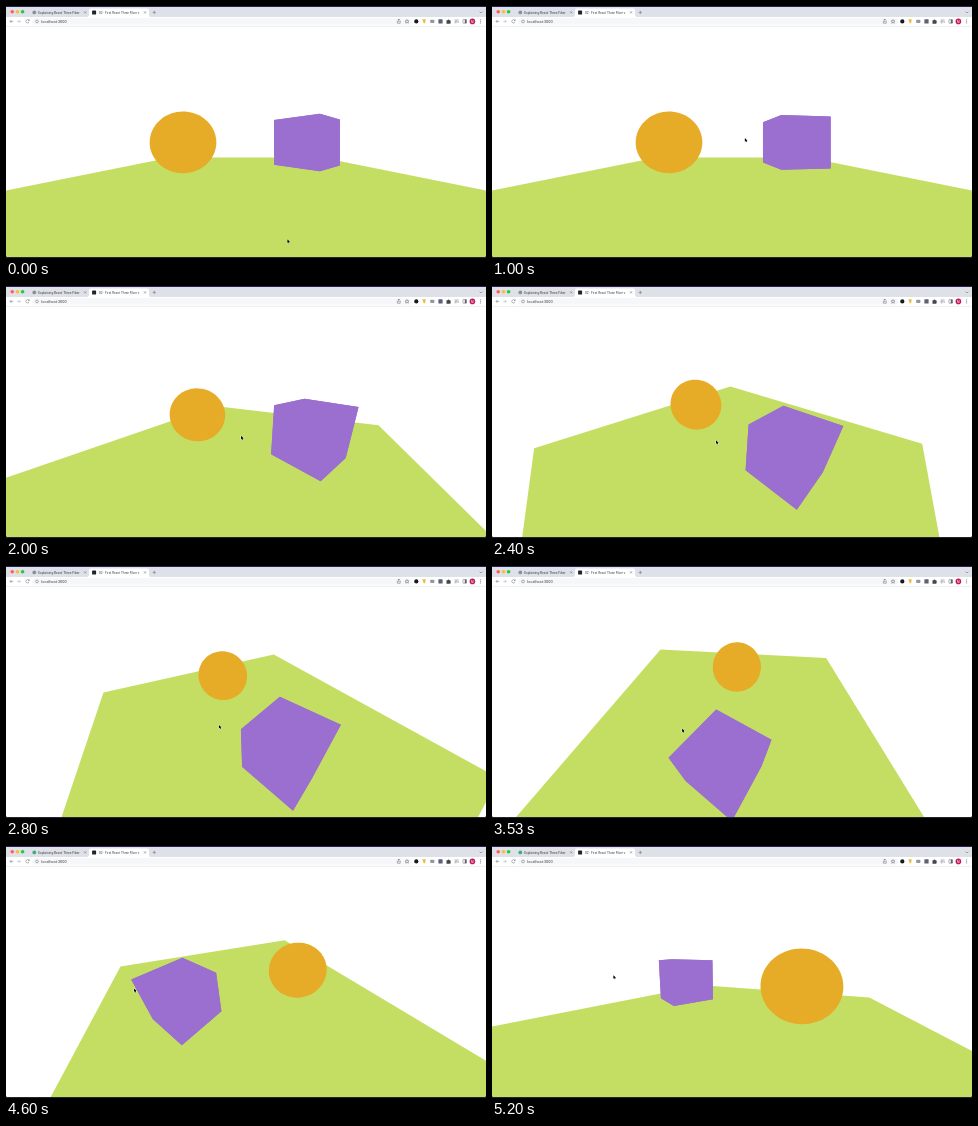
Animation, 480 px wide and 252 px high, one loop 5.27 s. Source, as an HTML page with a canvas:

```html
<!DOCTYPE html>
<html lang="en">
<head>
<meta charset="utf-8">
<title>First scene</title>
<style>
  html, body { margin: 0; width: 100%; height: 100%; overflow: hidden; background: #fff; }
  canvas, svg { position: absolute; left: 0; top: 0; width: 480px; height: 252px; display: block; }
  text { font-family: Roboto, "Liberation Sans", sans-serif; fill: #3c4043; }
  .line { fill: none; stroke: #5f6368; stroke-width: .5; }
  #tabIcon { animation: icon 5.27s step-end infinite; }
  @keyframes icon { 0% { fill: #8b9196; } 80.2% { fill: #3fae7c; } }
</style>
</head>
<body>
<canvas id="view" width="480" height="252"></canvas>
<svg viewBox="0 0 480 252">
  <rect width="480" height="20.3" fill="#fff"/>
  <rect width="480" height="11" fill="#dee1e7"/>
  <rect width="480" height="1" fill="#26244e"/>
  <circle cx="6.2" cy="5.7" r="1.8" fill="#fe5f57"/>
  <circle cx="11.4" cy="5.7" r="1.8" fill="#febc2e"/>
  <circle cx="16.6" cy="5.7" r="1.8" fill="#28c840"/>

  <circle id="tabIcon" cx="28.3" cy="6.4" r="1.9"/>
  <text x="32.2" y="7.5" font-size="3.3">Explaining React Three Fiber</text>
  <path class="line" d="M78.2 5.4l2 2m0-2l-2 2"/>

  <path d="M81 11q2 0 2-2V4.5q0-2 2-2h56q2 0 2 2V9q0 2 2 2z" fill="#fff"/>
  <rect x="86.1" y="4.5" width="4" height="4" rx=".6" fill="#20232a"/>
  <text x="93" y="7.5" font-size="3.2">02 - First React Three Fiber v</text>
  <path class="line" d="M138 5.4l2 2m0-2l-2 2M146.6 6.4h3.4m-1.7-1.7v3.4M473.6 5.6l1.4 1.4 1.4-1.4"/>

  <rect x="26" y="12" width="380" height="6.8" rx="3.4" fill="#f6f7f9"/>
  <path class="line" d="M7.3 15.4H4m1.5-1.5L4 15.4l1.5 1.5"/>
  <path class="line" d="M11 15.4h3.3m-1.5-1.5l1.5 1.5-1.5 1.5" opacity=".55"/>
  <path class="line" d="M23 14.4a1.7 1.7 0 1 0 .1 1.7M23.3 13.4v1.3H22"/>
  <circle class="line" cx="31" cy="15.4" r="1.4"/>
  <text x="35.3" y="16.6" font-size="3.85">localhost:3000</text>

  <path class="line" d="M391.4 14.6v2.6h2.8v-2.6M392.8 16v-3m-1 1l1-1 1 1"/>
  <path class="line" d="M401 13.5l.6 1.3 1.4.1-1.1.9.4 1.4-1.3-.8-1.3.8.4-1.4-1.1-.9 1.4-.1z"/>
  <circle cx="410.3" cy="15.4" r="2.1" fill="#17191d"/>
  <path d="M416.4 13.3h3.4l-.8 4h-1.3z" fill="#e9bd3c"/>
  <rect x="424.2" y="13.8" width="4.2" height="3.2" rx=".8" fill="#9398a0"/>
  <rect x="432.4" y="13.3" width="4.2" height="4.2" rx=".5" fill="#5c617a"/>
  <path d="M440.5 14.2h1.2a.8.8 0 0 1 1.6 0h1.1v1a.8.8 0 0 1 0 1.5v1h-3.9z" fill="#41464c"/>
  <path class="line" d="M448.6 14h4m-4 1.4h2.5m-2.5 1.4h2m1.5-1.8v2"/>
  <rect class="line" x="456.9" y="13.6" width="3.6" height="3.6" rx=".5"/>
  <path d="M458.8 13.6h1.7v3.6h-1.7z" fill="#5f6368"/>
  <circle cx="466.4" cy="15.4" r="2.8" fill="#c2185b"/>
  <text x="466.4" y="16.5" font-size="3" text-anchor="middle" style="fill:#fff">M</text>
  <path d="M474.7 13.8v4" stroke="#5f6368" stroke-width=".9" stroke-linecap="round" stroke-dasharray="0 1.6"/>
  <path d="M0 20.3h480" stroke="#dfe1e5" stroke-width=".6"/>
  <path d="M0 249.5V252h480v-2.5q0 1.5-1.5 1.5h-477q-1.5 0-1.5-1.5z" fill="#20242c"/>
</svg>
<script>
const ctx = document.getElementById('view').getContext('2d');
const LOOP = 5270, STEP = 200 / 3;
const CX = 240, CY = 136.4, FOCAL = 151.2, RADIUS = 5;
const COLORS = { floor: '#c4de64', ball: '#e6ac28', box: '#9b6fd0' };

// The pointer grabs the view at GRAB; dragging one view height is a full turn.
const GRAB = { t: 1.3, x: 259.5, y: 131 };
const DRAG_SCALE = 232 / (2 * Math.PI);
const DAMPING = .25;

// pointer path: time, then turn and tilt in radians of drag
const PATH = [
  [0, -.593, 2.77], [.55, .15, .1], [1, .18, .03], [GRAB.t, 0, 0],
  [2, .662, .509], [2.8, 1.262, .756], [3.533, 1.88, .854],
  [4.45, 2.649, .708], [4.6, 3.56, .31], [5.2, 3.741, -.05]
];

function dragAt(t) {
  const i = Math.max(1, PATH.findIndex(p => p[0] >= t));
  const a = PATH[i - 1], b = PATH[i], s = (t - a[0]) / (b[0] - a[0]);
  return [1, 2].map(j => a[j] + (b[j] - a[j]) * s);
}

// the camera trails the drag exponentially, solved exactly per straight stretch
function orbitAt(t) {
  let pose = [0, 0];
  for (let i = 1; i < PATH.length; i++) {
    const a = PATH[i - 1], b = PATH[i];
    if (a[0] < GRAB.t || a[0] >= t) continue;
    const h = Math.min(t, b[0]) - a[0], decay = Math.exp(-h / DAMPING);
    pose = pose.map((p, j) => {
      const from = a[j + 1], speed = (b[j + 1] - from) / (b[0] - a[0]);
      const lag = speed * DAMPING;
      return from + speed * h - lag + (p - from + lag) * decay;
    });
  }
  return pose;
}

// world point to right, up and depth as seen by the camera
function makeCamera([turn, tilt]) {
  const sa = Math.sin(turn), ca = Math.cos(turn), se = Math.sin(tilt), ce = Math.cos(tilt);
  return ([x, y, z]) => {
    const g = x * sa + z * ca;
    return [x * ca - z * sa, y * ce - g * se, RADIUS - g * ce - y * se];
  };
}

function clipNear(pts, near = .1) {
  const out = [];
  pts.forEach((p, i) => {
    const q = pts[(i + 1) % pts.length];
    if (p[2] >= near) out.push(p);
    if ((p[2] >= near) !== (q[2] >= near)) {
      const k = (near - p[2]) / (q[2] - p[2]);
      out.push(p.map((v, j) => v + (q[j] - v) * k));
    }
  });
  return out;
}

function fillShape(pts, color) {
  ctx.beginPath();
  for (const [x, y, d] of clipNear(pts)) ctx.lineTo(CX + FOCAL * x / d, CY - FOCAL * y / d);
  ctx.fillStyle = color;
  ctx.fill();
}

// corners of a level square around (cx, cz)
function square(cx, y, cz, size, angle) {
  const r = size * Math.SQRT1_2;
  return [0, 1, 2, 3].map(i => {
    const a = angle + i * Math.PI / 2;
    return [cx + r * Math.cos(a), y, cz + r * Math.sin(a)];
  });
}

function drawFloor(cam) {
  fillShape(square(0, -1, 0, 10, Math.PI / 4).map(cam), COLORS.floor);
}

// outline of a unit sphere: the circle where sight lines touch it
function drawBall(c) {
  const d = Math.hypot(...c), n = c.map(v => v / d);
  const k = Math.hypot(n[0], n[2]);
  const u = [n[2] / k, 0, -n[0] / k];
  const v = [n[1] * u[2], n[2] * u[0] - n[0] * u[2], -n[1] * u[0]];
  const r = Math.sqrt(1 - 1 / (d * d));
  const ring = Array.from({ length: 72 }, (_, i) => {
    const a = i * Math.PI / 36;
    return c.map((p, j) => p - n[j] / d + r * (u[j] * Math.cos(a) + v[j] * Math.sin(a)));
  });
  fillShape(ring, COLORS.ball);
}

function drawBox(cam, t) {
  const angle = 94 * Math.PI / 180 - .99 * t;
  const [top, low] = [.75, -.75].map(y => square(2, y, 0, 1.5, angle).map(cam));
  fillShape(low, COLORS.box);
  for (let i = 0; i < 4; i++) {
    const j = (i + 1) % 4;
    fillShape([top[i], top[j], low[j], low[i]], COLORS.box);
  }
  fillShape(top, COLORS.box);
}

const ARROW = new Path2D('M0 0V3.6L.9 2.9 1.5 4.2 2.1 3.9 1.6 2.6H2.7Z');

function drawPointer([turn, tilt]) {
  ctx.save();
  ctx.translate(GRAB.x - turn * DRAG_SCALE, GRAB.y + tilt * DRAG_SCALE);
  ctx.lineWidth = .7;
  ctx.strokeStyle = '#fff';
  ctx.stroke(ARROW);
  ctx.fillStyle = '#000';
  ctx.fill(ARROW);
  ctx.restore();
}

function draw(t) {
  const cam = makeCamera(orbitAt(t));
  const ball = cam([-2, 0, 0]), box = cam([2, 0, 0]);
  ctx.fillStyle = '#fff';
  ctx.fillRect(0, 0, 480, 252);
  drawFloor(cam);
  const solids = [
    { depth: ball[2], paint: () => drawBall(ball) },
    { depth: box[2], paint: () => drawBox(cam, t) }
  ];
  solids.sort((a, b) => b.depth - a.depth).forEach(s => s.paint());
  drawPointer(dragAt(t));
}

function tick() {
  const ms = performance.now() % LOOP;
  const t = Math.floor((ms + 3.4) / STEP) * STEP / 1000;
  draw(Math.min(t, 5.2));
  requestAnimationFrame(tick);
}
tick();
</script>
</body>
</html>
```
